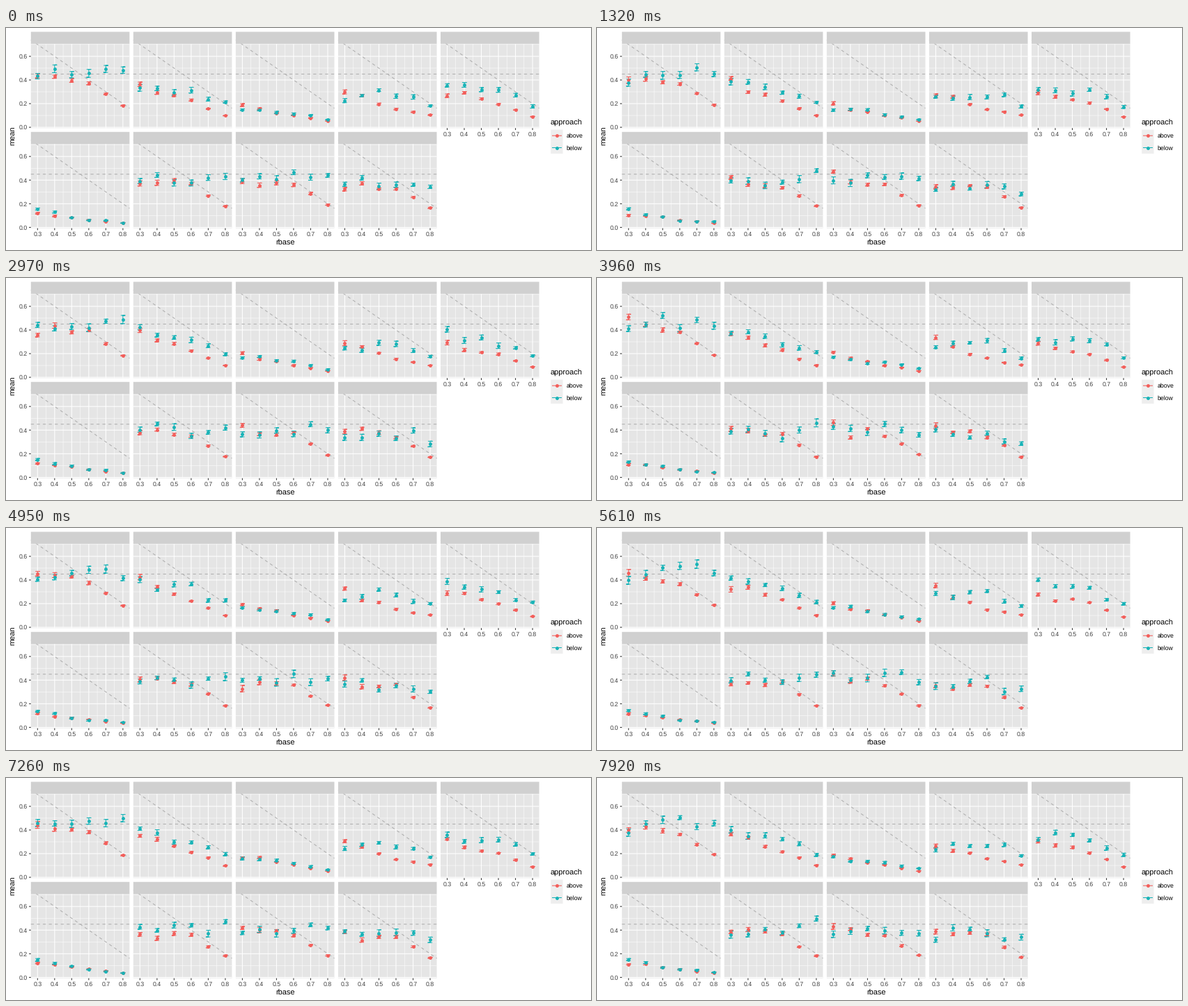
Recreate the animation shown at these times as a matplotlib script. Size 840 by 320 pixels, loop 8 s.

```python
import numpy as np
import matplotlib.pyplot as plt
from matplotlib.animation import FuncAnimation
from matplotlib.collections import LineCollection
from matplotlib.patches import Rectangle

plt.rcParams["text.hinting"] = "none"

W, H, DPI = 840, 320, 100
PX = 72 / DPI
LOOP, STEP, HOLD = 8000, 40, 330
TRIALS = -(-LOOP // HOLD)

RED, TEAL = "#F35E5A", "#17B3B7"
PANEL, STRIP, KEY = "#E5E5E5", "#D0D0D0", "#EEEEEE"
TICK_TEXT, TICK, STRIP_TEXT = "#404040", "#333333", "#1A1A1A"

# Typical mean at rbase 0.3, 0.6 and 0.8, for "above" and for "below".
TRENDS = {
    "donut": [(.435, .385, .188), (.43, .48, .47)],
    "line": [(.36, .225, .10), (.39, .32, .21)],
    "ordered_line": [(.185, .105, .053), (.17, .12, .07)],
    "parallelCoordinates": [(.30, .155, .105), (.25, .30, .18)],
    "radar": [(.285, .205, .09), (.36, .30, .187)],
    "scatterplot": [(.118, .066, .036), (.145, .066, .045)],
    "stackedarea": [(.39, .36, .182), (.40, .385, .435)],
    "stackedbar": [(.40, .365, .19), (.40, .43, .42)],
    "stackedline": [(.37, .35, .168), (.36, .38, .33)],
}
XS = np.linspace(0.3, 0.8, 6)
N = len(TRENDS)

# Every trial scatters around the trend; "above" settles as rbase grows.
trend = np.array([[np.interp(XS, (0.3, 0.6, 0.8), keys) for keys in pair]
                  for pair in TRENDS.values()])
spread = trend * [np.geomspace(0.10, 0.02, 6), np.full(6, 0.08)]
size = trend * [np.geomspace(0.05, 0.018, 6), np.full(6, 0.055)] + 0.001
rng = np.random.default_rng(7)
shape = (TRIALS, *trend.shape)
means = trend + spread * np.clip(rng.standard_normal(shape), -1.8, 1.8)
errors = size * rng.uniform(0.6, 1.35, shape)

# Panel geometry in pixels
PW, PH, STRIP_H = 141.57, 121.5, 17.3
LEFT, TOP, PITCH_X, PITCH_Y = 35.8, 22.8, 147.05, 144.3
XMIN, XMAX, YMIN = 0.26125, 0.83875, -0.007
XSCALE, YSCALE = PW / (XMAX - XMIN), 170.4
CAP = 0.0125 * XSCALE


def corner(k):
    """Left and top edge of a panel."""
    return LEFT + PITCH_X * (k % 5), TOP + PITCH_Y * (k // 5)


def px(k, x):
    return corner(k)[0] + (x - XMIN) * XSCALE


def py(k, y):
    return corner(k)[1] + PH - (y - YMIN) * YSCALE


fig = plt.figure(figsize=(W / DPI, H / DPI), dpi=DPI, facecolor="white")
ax = fig.add_axes([0, 0, 1, 1])
ax.set_xlim(0, W)
ax.set_ylim(H, 0)
ax.axis("off")


def label(x, y, s, size=8.8, color=TICK_TEXT, ha="center", **kw):
    ax.text(x, y, s, fontsize=size * PX, color=color, ha=ha,
            family="Liberation Sans", **{"va": "baseline", **kw})


def box(x, y, w, h, color, z=0):
    ax.add_patch(Rectangle((x, y), w, h, fc=color, ec="none", zorder=z,
                           snap=False))


def lines(segs, color, width, z, style="solid"):
    lc = LineCollection(segs, colors=color, linewidths=width * PX, zorder=z,
                        linestyles=style, capstyle="butt")
    lc.set_snap(False)
    ax.add_collection(lc, autolim=False)


minor, major, guides, ticks = [], [], [], []
for k, name in enumerate(TRENDS):
    left, top = corner(k)
    right, base = left + PW, top + PH
    box(left, top, PW, PH, PANEL)
    box(left, top - STRIP_H, PW, STRIP_H, STRIP, 3.5)
    label(left + PW / 2, top - 5, name, color=STRIP_TEXT)

    for x in XS:
        X = px(k, x)
        major.append([(X, top), (X, base)])
        if x < 0.79:
            half = X + 0.05 * XSCALE
            minor.append([(half, top), (half, base)])
        if k >= 4:
            ticks.append([(X, base), (X, base + 2.75)])
            label(X, base + 11.7, f"{x:.1f}")
    for i in range(8):
        Y = py(k, i / 10)
        (minor if i % 2 else major).append([(left, Y), (right, Y)])
        if i % 2 == 0 and k % 5 == 0:
            ticks.append([(left - 2.75, Y), (left, Y)])
            label(left - 4.9, Y + 3.2, f"{i / 10:.1f}", ha="right")

    # The falling guide starts behind the strip.
    guides += [[(left, py(k, 0.45)), (right, py(k, 0.45))],
               [(left, py(k, 1 - XMIN)), (right, py(k, 1 - XMAX))]]

lines(minor, "white", 0.53, 1)
lines(major, "white", 1.07, 2)
lines(ticks, TICK, 1.07, 2)
lines(guides, "#AFAFAF", 1.07, 3, (0, (4, 4)))

label(400.8, 312.8, "rbase", 11, "black")
label(10, 155.5, "mean", 11, "black", rotation=90, va="center")
label(782, 140, "approach", 11, "black", ha="left")


def marks(color, z):
    bar, = ax.plot([], [], color=color, lw=1.07 * PX, zorder=z, snap=False,
                   solid_capstyle="butt")
    dot, = ax.plot([], [], "o", color=color, ms=4.9 * PX, mew=0, zorder=z + 2,
                   snap=False)
    return bar, dot


for row, (text, color) in enumerate([("above", RED), ("below", TEAL)]):
    y = 155.2 + 17.3 * row
    box(782.2, y - 8.65, 17.3, 17.3, KEY)
    lines([[(784, y), (798, y)]], color, 1.07, 4)
    ax.plot([790.9], [y], "o", color=color, ms=4.9 * PX, mew=0, snap=False)
    label(804.8, y + 3.1, text, color="black", ha="left")

groups = [marks(RED, 4), marks(TEAL, 5)]
X = np.concatenate([px(k, XS) for k in range(N)])

# Each error bar is one pen stroke, ended by a gap.
bar_x = np.stack([X - CAP, X + CAP, X, X, X - CAP, X + CAP, X * np.nan], 1)


def draw(i):
    trial = int((i + 0.5) * STEP / HOLD) % TRIALS
    for g, (bar, dot) in enumerate(groups):
        mid = np.concatenate([py(k, means[trial, k, g]) for k in range(N)])
        err = errors[trial, :, g].ravel() * YSCALE
        hi, lo = mid - err, mid + err
        bar_y = np.stack([hi, hi, hi, lo, lo, lo, lo * np.nan], 1)
        bar.set_data(bar_x.ravel(), bar_y.ravel())
        dot.set_data(X, mid)
    return [artist for pair in groups for artist in pair]


anim = FuncAnimation(fig, draw, frames=LOOP // STEP, interval=STEP,
                     init_func=lambda: draw(0), repeat=True, repeat_delay=0)
plt.show()
```
